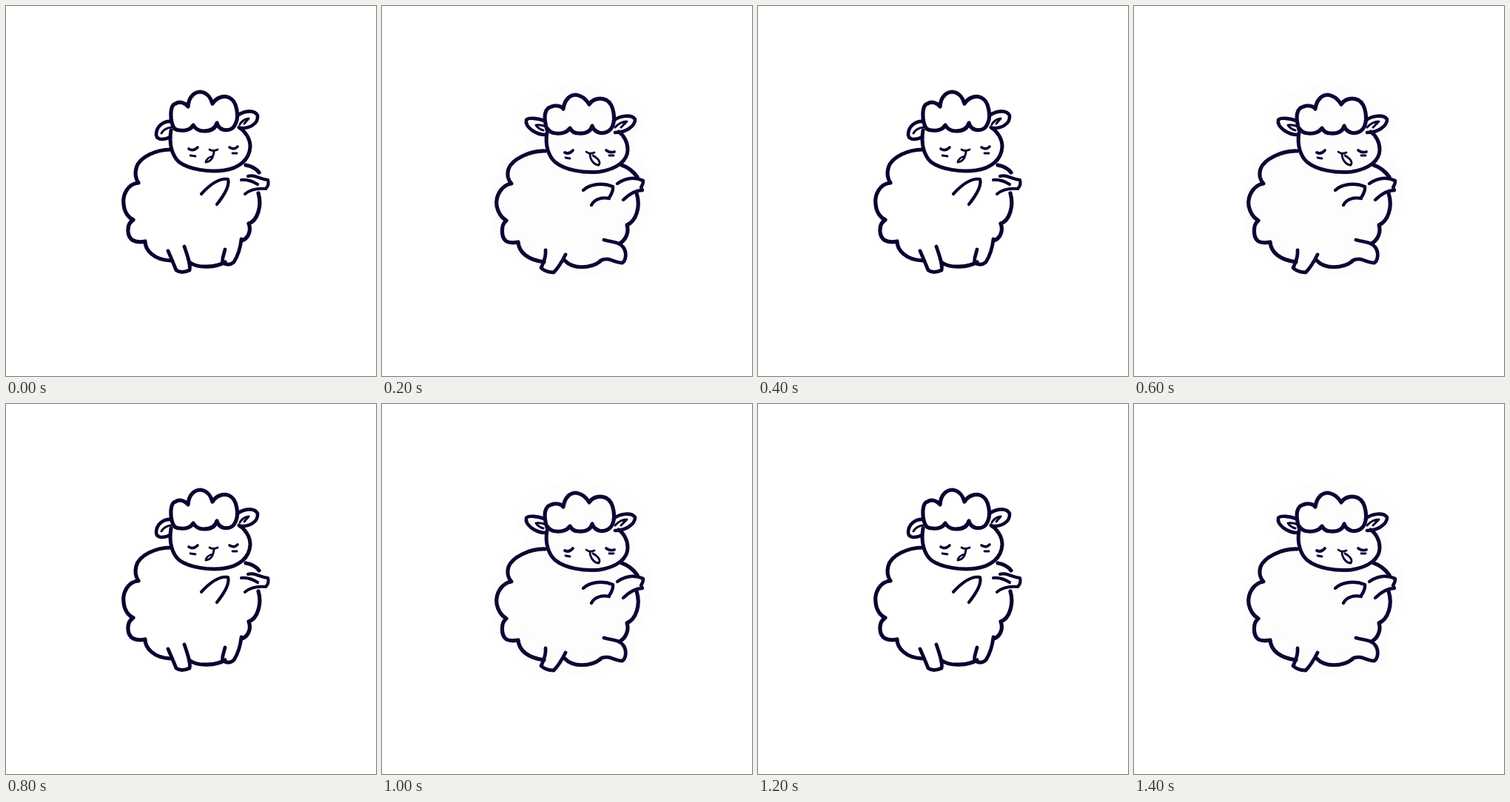
Recreate the animation shown at these times as an HTML page with a canvas. Size 500 by 500 pixels, loop 1600 ms.

```html
<!DOCTYPE html>
<html lang="en">
<head>
<meta charset="utf-8">
<title>Dancing sheep</title>
<style>
html, body { margin: 0; width: 100%; height: 100%; overflow: hidden; background: #fff; }
canvas { display: block; width: 500px; height: 500px; }
</style>
</head>
<body>
<canvas id="stage" width="500" height="500"></canvas>
<script>
const ctx = document.getElementById('stage').getContext('2d');
const STEP = 200;

const stroke = (width, d) => ({ width, path: new Path2D(d) });

const leanLeft = {
  ink: '#08042f',
  parts: [
    // wool cap
    stroke(5.2, `M228 166C221 157 221 134 229 132C235 128 242 131 246 136
      C247 121 256 116 263 116C272 117 277 125 279 132C284 124 294 120 302 124
      C313 129 314 150 311 157C308 167 300 169 293 167C288 165 286 162 285 158
      C283 166 276 169 267 169C260 169 256 166 253 161C250 167 242 169 236 168Q228 168 226 163`),
    // head and ears
    stroke(5, `M223 168C220 186 224 202 234 211C248 221 275 225 295 222
      C315 219 329 208 330 190C330 179 323 169 315 164`),
    stroke(4.6, `M224 156C212 155 203 163 203 174C204 182 214 181 222 177
      M313 148C322 141 336 140 340 148C341 160 328 166 316 165`),
    stroke(3, 'M223 164Q214 165 210 172M316 160Q320 153 328 152L322 159'),
    // face
    stroke(3.6, 'M247 193Q253 197 259 191M302 191Q308 195 313 190'),
    stroke(2.8, `M249 202L256 203M306 199L312 199M275 194Q280 197 286 194
      M281 197C280 204 278 210 270 211Q271 205 279 203`),
    // body
    stroke(5.2, `M222 194C205 194 180 203 176 219C173 230 177 236 179 239
      C165 240 157 255 159 268C160 280 167 287 172 289C162 295 163 312 172 317
      Q179 320 188 318C188 330 200 343 222 344M249 347C260 355 285 353 296 346
      M319 317C327 314 332 304 328 294C340 290 346 270 341 253M324 215Q336 217 342 225`),
    // legs
    stroke(4.8, `M219 331C223 340 228 352 230 357Q237 362 248 357C250 350 245 337 241 325
      M296 329C294 337 291 344 293 347Q301 352 308 346C313 338 317 325 318 315`),
    // arms
    stroke(4.2, `M264 254C274 243 287 232 300 234C303 244 293 258 285 268
      M318 235Q329 234 340 241M327 230C336 227 342 234 354 235
      Q356 242 351 247C340 246 330 248 323 254`)
  ]
};

const leanRight = {
  ink: '#0c0734',
  halo: new Path2D(`M215 195L190 155L215 130L262 115L308 126L344 150L328 176L332 204L354 235
    L345 285L331 310L330 346L270 353L218 360L184 319L167 315L157 268L173 215Z`),
  parts: [
    stroke(5.2, `M223 167C218 151 219 138 229 136C236 133 243 136 245 139
      C247 125 255 120 262 120C271 121 277 128 280 133C284 126 294 123 303 127
      C314 133 315 153 312 161C309 170 300 173 293 171C288 169 285 166 284 162
      C282 170 274 173 266 172C259 172 256 169 254 165C250 171 242 173 235 172Q228 172 223 165`),
    stroke(5, `M223 171C220 188 225 203 234 211C248 222 272 226 294 224
      C318 220 332 209 332 194C332 184 327 175 320 170`),
    stroke(4.6, `M219 155C211 152 198 150 195 154C193 163 207 174 221 174
      M313 155C321 148 337 146 342 153C342 163 329 171 315 171`),
    stroke(3, 'M222 163Q214 160 208 161Q211 166 218 168M315 164Q322 156 331 156L323 164'),
    stroke(3.8, 'M247 198Q253 201 258 195M303 195Q308 199 314 197'),
    stroke(2.8, `M248 205L254 206M307 202L313 202M276 197Q281 201 287 198
      M281 200C281 208 287 215 293 215Q297 209 285 202`),
    stroke(5.2, `M221 196C200 195 176 207 171 220C168 230 172 237 175 240
      C162 242 153 256 155 270C157 281 163 287 168 290C160 296 161 313 168 318
      Q174 321 184 319C185 333 197 343 219 346M247 344C258 356 282 355 295 345
      M321 321C330 316 334 305 331 296C343 291 350 272 344 253M324 215Q336 219 345 231`),
    stroke(4.8, `M221 330C222 341 217 349 215 354Q222 360 232 360C239 353 244 344 248 336
      M300 316C309 319 320 318 326 326C331 333 330 343 325 347C316 348 306 338 295 344`),
    stroke(4.4, `M272 249C280 241 297 238 312 244Q313 250 307 259M283 269C287 261 297 258 307 260
      M318 240C328 233 340 230 353 236Q353 241 350 245L352 249C341 249 332 256 326 262`)
  ]
};

const poses = [leanLeft, leanRight];

function draw({ ink, halo, parts }) {
  ctx.fillStyle = '#fff';
  ctx.fillRect(0, 0, 500, 500);
  ctx.lineCap = ctx.lineJoin = 'round';
  if (halo) {
    ctx.fillStyle = ctx.strokeStyle = '#fdfdfd';
    ctx.lineWidth = 26;
    ctx.fill(halo);
    ctx.stroke(halo);
  }
  ctx.strokeStyle = ink;
  for (const { width, path } of parts) {
    ctx.lineWidth = width;
    ctx.stroke(path);
  }
}

const start = performance.now();

function tick() {
  const time = performance.now() - start;
  draw(poses[Math.floor(time / STEP) % poses.length]);
  requestAnimationFrame(tick);
}
tick();
</script>
</body>
</html>
```
